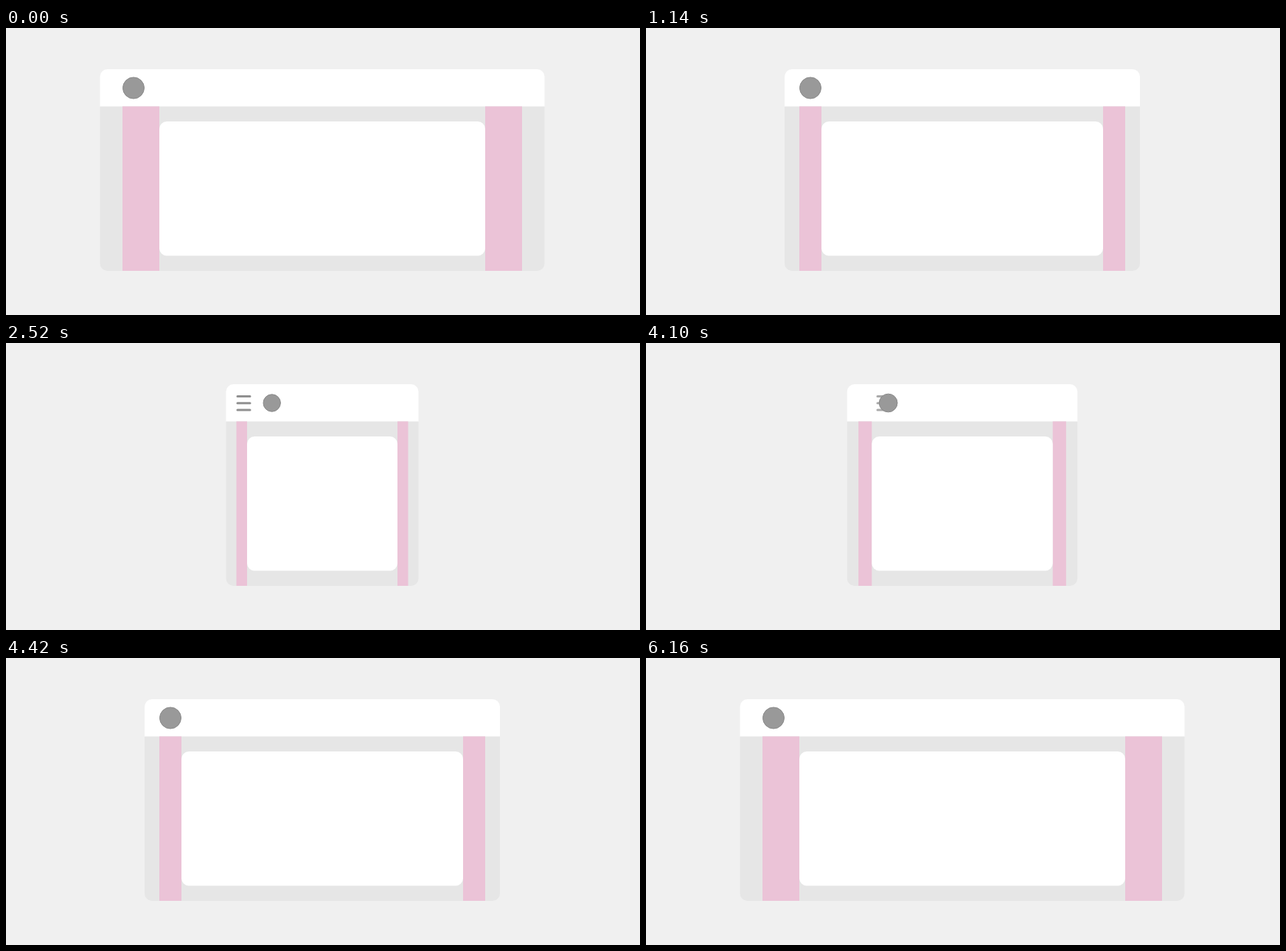
These frames come from a looping animation (860 px wide and 390 px high, 7060 ms). An HTML page with a canvas:

```html
<!DOCTYPE html>
<html lang="en">
<head>
<meta charset="utf-8">
<title>Responsive margins</title>
<style>
  html, body { margin: 0; width: 100%; height: 100%; overflow: hidden; background: #f0f0f0; }
  canvas { display: block; }
</style>
</head>
<body>
<canvas width="860" height="390"></canvas>
<script>
const ctx = document.querySelector('canvas').getContext('2d');
const LOOP = 7060;
const STEPS = 9;
const CENTER = 429;
const TOP = 56, HEADER_BOTTOM = 106.5, BOTTOM = 330;

const wide = { panel: 127.5, marginStart: 158, marginEnd: 208, logoX: 173, logoR: 15, menu: 0 };
const medium = { panel: 188, marginStart: 208, marginEnd: 238, logoX: 223, logoR: 15, menu: 0 };
const narrow = { panel: 298.5, marginStart: 312.5, marginEnd: 327, logoX: 360.7, logoR: 12.2, menu: 1 };

const transitions = [
  { start: 800, end: 1140, from: wide, to: medium },
  { start: 2220, end: 2520, from: medium, to: narrow },
  { start: 4100, end: 4420, from: narrow, to: medium },
  { start: 5840, end: 6160, from: medium, to: wide },
];

const easeOut = x => 1 - (1 - x) ** 2.25;

function layoutAt(time) {
  const current = transitions.filter(tr => time >= tr.start).pop();
  if (!current) return wide;
  const { start, end, from, to } = current;
  const step = 1 + Math.floor((time - start) / (end - start) * (STEPS - 1));
  const p = easeOut(Math.min(step / STEPS, 1));
  const layout = {};
  for (const key in from) layout[key] = from[key] + (to[key] - from[key]) * p;
  return layout;
}

// Fills a box that is symmetric about the centre line.
function centeredBox(left, top, bottom, color, radius) {
  ctx.fillStyle = color;
  ctx.beginPath();
  ctx.roundRect(left, top, 2 * (CENTER - left), bottom - top, radius);
  ctx.fill();
}

function drawMenu(opacity) {
  ctx.globalAlpha = opacity;
  ctx.strokeStyle = '#909090';
  ctx.lineWidth = 3;
  ctx.lineCap = 'round';
  ctx.beginPath();
  for (const y of [72.5, 81.8, 91]) {
    ctx.moveTo(314, y);
    ctx.lineTo(331, y);
  }
  ctx.stroke();
  ctx.globalAlpha = 1;
}

function drawLogo(x, radius) {
  ctx.fillStyle = '#999';
  ctx.strokeStyle = '#8a8a8a';
  ctx.lineWidth = 1;
  ctx.beginPath();
  ctx.arc(x, 81.5, radius - 0.5, 0, 2 * Math.PI);
  ctx.fill();
  ctx.stroke();
}

function draw({ panel, marginStart, marginEnd, logoX, logoR, menu }) {
  ctx.fillStyle = '#f0f0f0';
  ctx.fillRect(0, 0, 860, 390);

  centeredBox(panel, HEADER_BOTTOM, BOTTOM, '#e6e6e6', [0, 0, 10, 10]);
  centeredBox(panel, TOP, HEADER_BOTTOM, '#fff', [10, 10, 0, 0]);

  ctx.fillStyle = '#ebc3d7';
  const marginWidth = marginEnd - marginStart;
  for (const x of [marginStart, 2 * CENTER - marginEnd]) {
    ctx.fillRect(x, HEADER_BOTTOM, marginWidth, BOTTOM - HEADER_BOTTOM);
  }

  centeredBox(marginEnd, 127, 309.5, '#fff', 10);
  drawMenu(menu);
  drawLogo(logoX, logoR);
}

const origin = performance.now();
function frame() {
  draw(layoutAt((performance.now() - origin) % LOOP));
  requestAnimationFrame(frame);
}
frame();
</script>
</body>
</html>
```
